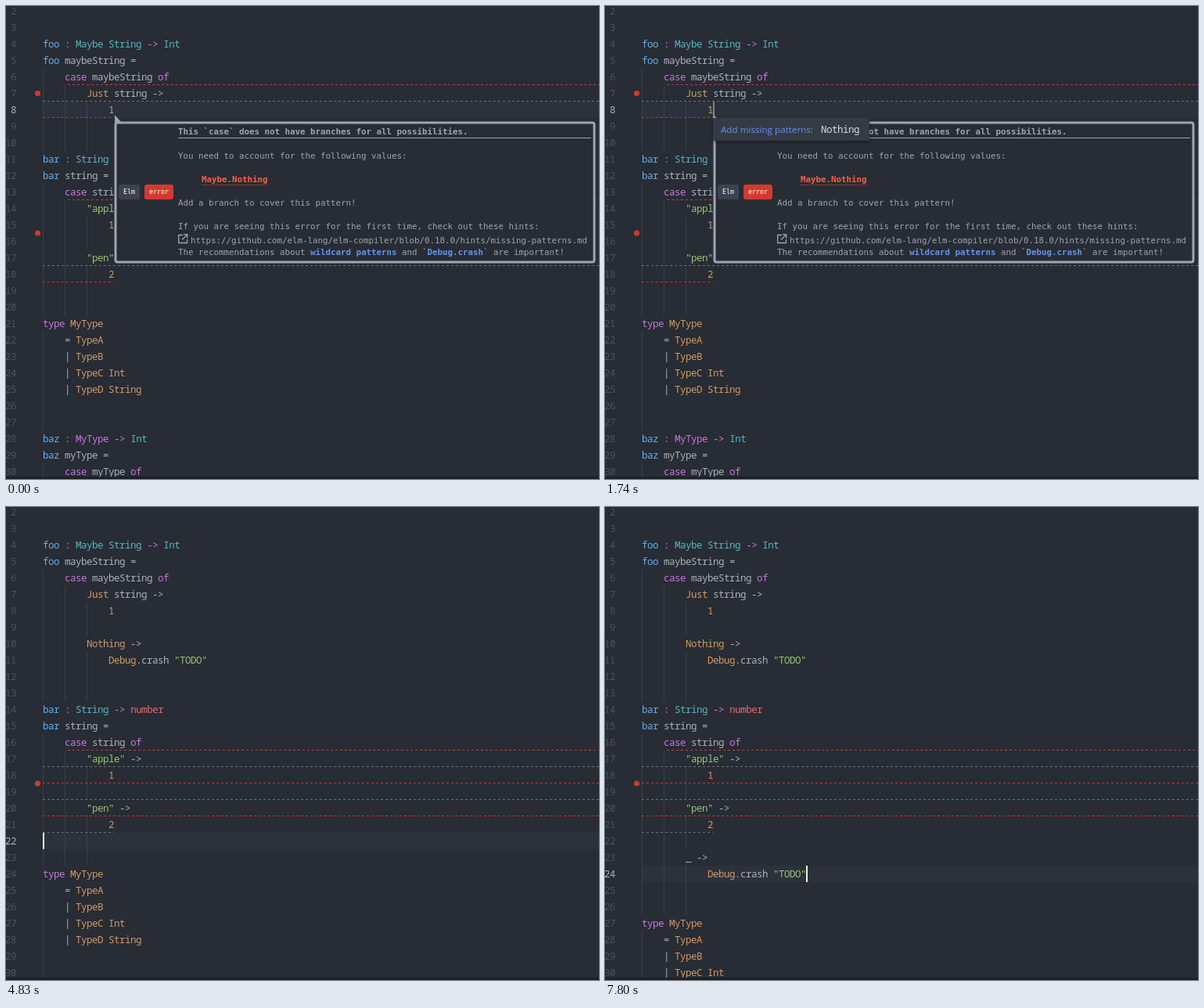
Write an HTML page that moves like this. It is 758 px wide and 604 px high and loops after 8000 ms.

```html
<!DOCTYPE html>
<html lang="en">
<head>
<meta charset="utf-8">
<title>Editor quick fixes</title>
<style>
html, body { margin: 0; width: 100%; height: 100%; overflow: hidden; background: #282c34; }
svg { display: block; width: 758px; height: 604px; }
.code { font: 12.5px "Noto Sans Mono", monospace; letter-spacing: -.5px; fill: #abb2bf; }
.note { font: 10.8px "DejaVu Sans Mono", monospace; fill: #9da5b4; }
.badge { font: 8.3px "DejaVu Sans Mono", monospace; fill: #fff; }
.label { font: 11.65px "Open Sans", sans-serif; fill: #6494ed; }
.menu { fill: #353b45; filter: drop-shadow(0 2px 2px rgba(0, 0, 0, .4)); }
.strong { font-weight: bold; }
.link { font-weight: bold; fill: #6494ed; }
.hot { font-weight: bold; fill: #ff5f45; }
</style>
</head>
<body>
<svg viewBox="0 0 758 604">
  <g id="code"></g>
  <rect id="cursor" width="2" height="21" fill="#f4efdc"/>
  <g id="overlay"></g>
  <path d="M0 602.5H758" stroke="#1d2026" stroke-width="3"/>
</svg>
<script>
const LOOP = 8000, LEFT = 47, CHAR = 7, ROW = 21, FIRST = 2, LAST = 30;
const BLUE = '#61afef', PURPLE = '#c678dd', CYAN = '#56b6c2', ORANGE = '#d19a66',
      GREEN = '#98c379', RED = '#e06c75';
const DASH = { r: '#d8321e', m: '#b8443b', g: '#6d7075' };
const $ = id => document.getElementById(id);

const unfixed = `

foo : Maybe String -> Int
foo maybeString =
    case maybeString of
        Just string ->
            1


bar : String -> number
bar string =
    case string of
        "apple" ->
            1

        "pen" ->
            2


type MyType
    = TypeA
    | TypeB
    | TypeC Int
    | TypeD String


baz : MyType -> Int
baz myType =
    case myType of`.split('\n');

function addBranch(doc, line, pattern) {
  const at = line - FIRST + 1;
  return [...doc.slice(0, at), '', `        ${pattern} ->`,
    '            Debug.crash "TODO"', ...doc.slice(at)];
}
const fixedFoo = addBranch(unfixed, 8, 'Nothing');
const docs = [unfixed, fixedFoo, addBranch(fixedFoo, 21, '_')];

const rowTop = line => (line - FIRST) * ROW - 4;
const indent = s => s.search(/\S/);

function colour(word, signature) {
  if (/^(foo|bar|baz)$/.test(word)) return BLUE;
  if (/^(case|of|type)$/.test(word)) return PURPLE;
  if (word[0] === '"') return GREEN;
  if (signature) return word === 'number' ? RED : /^(Int|Maybe|String)$/.test(word) ? CYAN : PURPLE;
  return /^[A-Z\d]/.test(word) ? ORANGE : '';
}

function highlight(s) {
  const signature = /^\w+ :/.test(s);
  return s.trim().replace(/"[^"]*"|->|\w+|:/g, word => {
    const fill = colour(word, signature);
    return fill ? `<tspan fill="${fill}">${word}</tspan>` : word;
  });
}

const text = (cls, x, y, s) => `<text class="${cls}" x="${x}" y="${y}">${s}</text>`;
const span = (cls, s) => `<tspan class="${cls}">${s}</tspan>`;

// One dashed line per flagged row: line number plus colour key.
function errorMarks(first, last, rows) {
  const marks = rows.map(([line, key]) => {
    const from = line === first ? 79 : LEFT, to = line === last ? 138 : 758;
    return `<path d="M${from} ${rowTop(line) + 20.5}H${to}" stroke="${DASH[key]}" stroke-dasharray="3"/>`;
  });
  const y = (rowTop(first) + rowTop(last + 1)) / 2;
  return marks.join('') + `<circle cx="40.5" cy="${y}" r="3.6" fill="#cb3b30"/>`;
}

function drawCode({ doc, active, fooError }) {
  let out = `<rect x="${LEFT}" y="${rowTop(active)}" width="711" height="${ROW}" fill="#2c313b"/>`;
  let depth = 0;
  for (let line = FIRST; line <= LAST; line++) {
    const s = docs[doc][line - FIRST], y = rowTop(line), n = String(line);
    if (s) depth = indent(s) / 4;
    for (let i = 0; i < depth; i++)
      out += `<path d="M${LEFT + .5 + i * 4 * CHAR} ${y}v${ROW}" stroke="#3b4049"/>`;
    out += `<text class="code" x="${13 - CHAR * n.length}" y="${y + 15}" style="fill:${
      line === active ? '#abb2bf' : '#4b5363'}">${n}</text>`;
    if (s) out += text('code', LEFT + CHAR * indent(s), y + 15, highlight(s));
  }
  if (fooError) out += errorMarks(6, 8, [[6, 'm'], [7, 'g'], [8, 'r']]);
  out += doc
    ? errorMarks(16, 21, [[16, 'm'], [17, 'g'], [18, 'r'], [19, 'g'], [20, 'r'], [21, 'g']])
    : errorMarks(13, 18, [[13, 'm'], [17, 'g'], [18, 'r']]);
  return out;
}

// Coordinates are relative to the bottom of the active row.
function drawPopup(missing, chars) {
  const note = (y, s, cls = '') => text('note ' + cls, 220, y, s);
  return `<path d="M139-4V6H148Z" fill="#9da5b4"/>
    <rect x="140" y="6" width="612" height="178" rx="2.5" fill="#282c34" stroke="#9da5b4" stroke-width="3"/>
    <rect x="144" y="85" width="27" height="19" rx="3" fill="#3c424f"/>
    <rect x="177" y="85" width="37" height="19" rx="3" fill="#d33a2f"/>
    <path d="M220 25.5H748" stroke="#9da5b4"/>
    <path d="M250 85.5h${chars * 6.5}" stroke="#c0503f" stroke-dasharray="1 1"/>
    <path d="M226 149.5H220.7V159.5H231.5V155M227 148.7H231.7V153.4M225 155.5L231.5 149"
      fill="none" stroke="#9da5b4" stroke-width="1.3"/>`
    + text('badge', 150, 97, 'Elm') + text('badge', 183, 97, 'error')
    + note(21, 'This `case` does not have branches for all possibilities.', 'strong')
    + note(52, 'You need to account for the following values:')
    + `<text class="note"><tspan class="hot" x="250" y="82">${missing}</tspan></text>`
    + note(112, 'Add a branch to cover this pattern!')
    + note(142, 'If you are seeing this error for the first time, check out these hints:')
    + text('note', 236, 160, 'https://github.com/elm-lang/elm-compiler/blob/0.18.0/hints/missing-patterns.md')
    + note(175, `The recommendations about ${span('link', 'wildcard patterns')} and \`${
        span('link', 'Debug.crash')}\` are important!`);
}

const drawMenu = pattern => '<rect class="menu" x="138" y="0" width="200" height="29" rx="2"/>'
  + text('label', 148, 19, 'Add missing patterns:')
  + `<text class="code" x="276" y="19" style="fill:#d7dae0">${pattern}</text>`;

function drawOverlay({ active, popup, menu }) {
  if (!popup) return '';
  const foo = active === 8;
  return `<g transform="translate(0 ${rowTop(active + 1)})">`
    + (foo ? drawPopup('Maybe.Nothing', 13)
           : drawPopup('&lt;values besides "apple" and "pen"&gt;', 34))
    + (menu ? drawMenu(foo ? 'Nothing' : '_') : '') + '</g>';
}

function stateAt(t) {
  const active = t < 2180 ? 8 : t < 3800 ? 11
    : t < 5130 ? Math.min(22, 12 + Math.floor((t - 3800) / 103))
    : t < 6900 ? 21 : 24;
  return {
    doc: t < 2180 ? 0 : t < 6900 ? 1 : 2,
    active,
    fooError: t < 4240,
    popup: t < 2180 || (t >= 5130 && t < 6900),
    menu: (t >= 1740 && t < 2180) || (t >= 6460 && t < 6900)
  };
}

// Cursor opacity over time, as [ms, opacity].
const blink = [[0, 0], [500, 0], [890, .95], [1040, 1], [1300, 1], [1740, .45], [1880, 0],
  [2180, 0], [2180, 1], [3100, 1], [3510, 0], [3800, 0], [3800, 1], [5450, 1], [5860, 0],
  [6010, .3], [6250, 1], [6610, .45], [6900, .45], [6900, 1], [LOOP, 1]];

function opacityAt(t) {
  const i = blink.findIndex(([end]) => end > t);
  const [t0, a] = blink[i - 1], [t1, b] = blink[i];
  return a + (b - a) * (t - t0) / (t1 - t0);
}

let shown = '';
function frame() {
  const t = performance.now() % LOOP, state = stateAt(t), key = JSON.stringify(state);
  if (key !== shown) {
    shown = key;
    $('code').innerHTML = drawCode(state);
    $('overlay').innerHTML = drawOverlay(state);
    const length = docs[state.doc][state.active - FIRST].length;
    $('cursor').setAttribute('x', LEFT + CHAR * length);
    $('cursor').setAttribute('y', rowTop(state.active));
  }
  $('cursor').setAttribute('opacity', opacityAt(t));
  requestAnimationFrame(frame);
}
frame();
</script>
</body>
</html>
```
